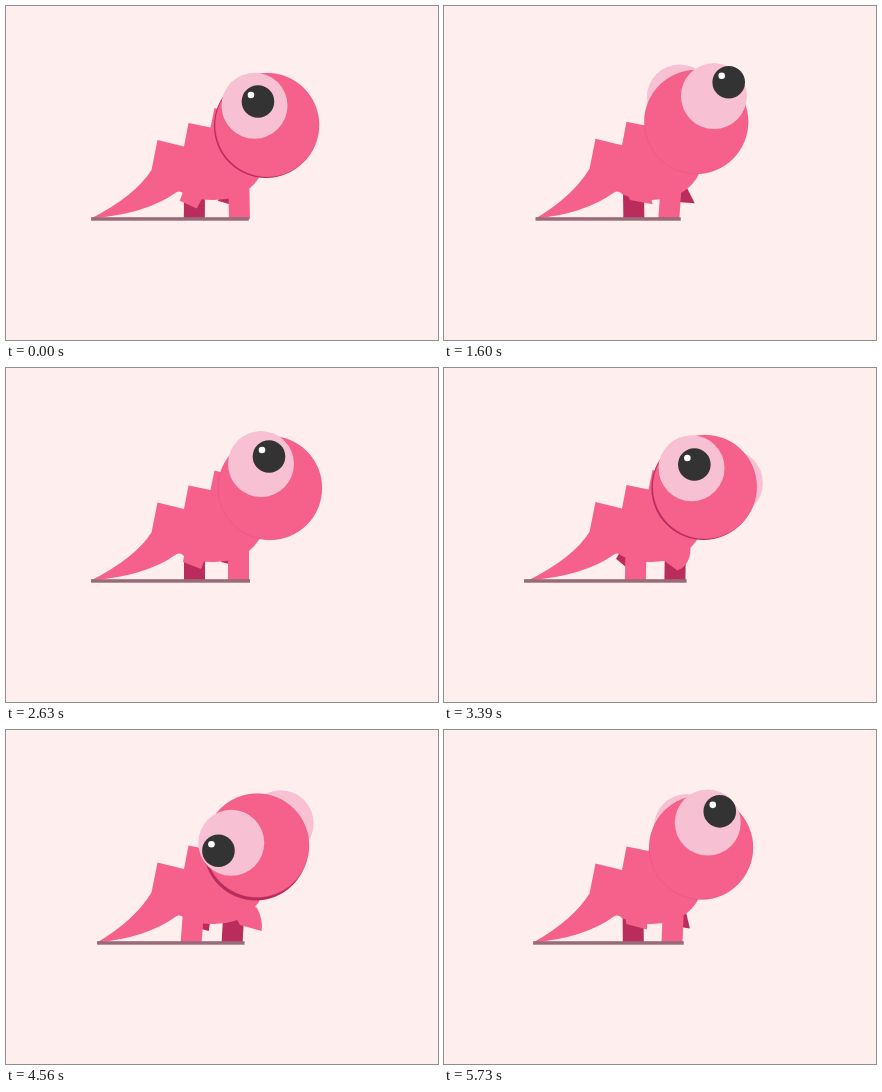
Write an HTML page with a canvas that moves like this. It is 432 px wide and 334 px high and loops after 5800 ms.

```html
<!DOCTYPE html>
<html lang="en">
<head>
<meta charset="utf-8">
<title>Walking dinosaur</title>
<style>
  html, body { margin: 0; width: 100%; height: 100%; overflow: hidden; background: #feefee; }
  canvas { display: block; }
</style>
</head>
<body>
<canvas id="stage" width="432" height="334"></canvas>
<script>
const ctx = document.getElementById('stage').getContext('2d');
const LOOP = 5800;
const C = {
  bg: '#feefee', pink: '#f5618b', dark: '#b92c5c', light: '#f8c0d3',
  ground: '#976b79', pupil: '#333333'
};

// Poses are held for about 70 ms; each beat is [start, last pose].
const beats = [[70, 630], [700, 1270], [1320, 1890], [1960, 2490], [2560, 3110],
  [3180, 3730], [3800, 4350], [4420, 4990], [5060, 5590], [5660, 6220]];
// Walk phase in strides at a few poses; it advances about a quarter per pose.
const strides = [[0, -0.077], [11, 2.5], [23, 5.2], [38, 9],
  [49, 11.583], [66, 15.735], [83, 20.13]];

const lerp = (a, b, k) => a + (b - a) * k;
const mix = (a, b, k) => a.map((v, i) => lerp(v, b[i], k));

function poseAt(t) {
  let pose = 0;
  beats.forEach(([start, end], g) => {
    for (let i = 0; i < 9; i++) {
      const at = start + Math.floor(i * (end - start) / 80 + 0.4) * 10;
      if (t >= at) pose = 1 + 9 * g + i;
    }
  });
  return Math.min(pose, 83);
}

function phaseAt(pose) {
  let i = 0;
  while (i < strides.length - 2 && pose >= strides[i + 1][0]) i++;
  const [a, pa] = strides[i], [b, pb] = strides[i + 1];
  const p = lerp(pa, pb, (pose - a) / (b - a));
  return p - Math.floor(p);
}

function disc(x, y, r, color) {
  ctx.fillStyle = color;
  ctx.beginPath();
  ctx.arc(x, y, r, 0, Math.PI * 2);
  ctx.fill();
}

function poly(points, color) {
  ctx.fillStyle = color;
  ctx.beginPath();
  points.forEach(([x, y]) => ctx.lineTo(x, y));
  ctx.closePath();
  ctx.fill();
}

// Planted leg: foot centre at rest, travel while it pushes back.
function planted(rest, travel, s, color) {
  const x = rest + travel * (s > 0 ? s : s * 0.5);
  const top = x - travel * 0.3 * s;
  poly([[top - 10.5, 180], [top + 10.5, 180], [x + 10.5, 213], [x - 10.5, 213]], color);
}

// Sole of a lifted leg: [heel x, heel y, toe x, toe y].
function sole(rest, front, s) {
  if (s > 0) return mix(rest, front, s);
  const back = [rest[0] - 15, rest[1] + 3, rest[2] - 20, rest[3] + 7];
  return mix(rest, back, -s);
}

function lifted(rest, front, s, hipA, hipB, color) {
  const [hx, hy, tx, ty] = sole(rest, front, s);
  poly([[hipA, 178], [hipB, 178], [tx, ty], [hx, hy]], color);
}

function body(tip, dy) {
  const y = v => v + dy;
  ctx.fillStyle = C.pink;
  ctx.beginPath();
  ctx.moveTo(tip, 212.5);
  ctx.quadraticCurveTo(129, 190, 145.5, y(164.5));
  ctx.lineTo(151.5, y(134.5));
  ctx.lineTo(178, y(141));
  ctx.lineTo(182.5, y(117.5));
  ctx.lineTo(204.5, y(122));
  ctx.lineTo(208.5, y(102.5));
  ctx.lineTo(226, y(107));
  ctx.lineTo(258, 160);
  ctx.quadraticCurveTo(254, 174, 243, 183);
  ctx.quadraticCurveTo(230, 194, 208, 194);
  ctx.quadraticCurveTo(190, 194, 178, 188);
  ctx.quadraticCurveTo(174, 184, 170, 186.5);
  ctx.quadraticCurveTo(140, 208, tip, 212.5);
  ctx.fill();
}

function nearFrontLifted(s) {
  const [hx, hy, tx, ty] = sole([217, 193, 226, 203], [234, 195, 256, 201], s);
  const k = Math.max(0, s);
  ctx.fillStyle = C.pink;
  ctx.beginPath();
  ctx.moveTo(224, 176);
  ctx.lineTo(hx, hy);
  ctx.lineTo(tx, ty);
  ctx.quadraticCurveTo(lerp(243, 257, k), lerp(200, 188, k), lerp(245, 251, k), lerp(181, 178, k));
  ctx.lineTo(244, 174);
  ctx.fill();
}

function farEye(u, e) {
  const near = [253, 105], left = [234, 90], low = [270, 122], right = [274, 93];
  if (u < 0.5) return mix(near, left, e);
  if (u < 1) return mix(low, left, e);
  if (u >= 1.5) return mix(near, right, e);
  const [x, y] = mix(low, right, e);
  return [x + 20 * Math.sin(2 * Math.PI * u) ** 2, y];
}

function draw(t) {
  const u = 2 * phaseAt(poseAt(t));
  const e = Math.sin(Math.PI * u) ** 2;
  const turnBack = u > 1;
  const nearStep = u < 0.5 || u >= 1.5;
  const s = (u % 1 < 0.5 ? 1 : -1) * e;

  ctx.fillStyle = C.bg;
  ctx.fillRect(0, 0, 432, 334);

  disc(...farEye(u, e), 33, C.light);

  if (nearStep) {
    planted(188.5, 1.5, s, C.dark);
    lifted([215, 194, 239, 200], [231, 196, 252, 197], s, 222, 241, C.dark);
  } else {
    planted(232.5, -6.5, s, C.dark);
    lifted([168, 189, 178, 201], [184, 196, 203, 201], s, 180, 206, C.dark);
  }

  const left = 82 + 3 * Math.cos(Math.PI * u) + 9.5 * (turnBack ? e * e : e);
  const right = 243.5 - (turnBack ? 5.5 : 8) * e;
  body(Math.max(left, 84), -2 * e);

  if (nearStep) {
    planted(232.5, -8.5, s, C.pink);
    lifted([177, 194, 195, 201], [187, 194, 210, 198], s, 180, 204, C.pink);
  } else {
    planted(193.5, -8.5, s, C.pink);
    nearFrontLifted(s);
  }

  ctx.fillStyle = C.ground;
  ctx.fillRect(left, 211.2, right - left + 0.5, 3.5);

  const hx = 264 - 13 * e, hy = 120 - 4.5 * e;
  if (turnBack) {
    const k = Math.min(1, 4 * e);
    disc(hx - 1.4 * k, hy + 0.5 * k + 2.5 * e, 52, C.dark);
  }
  disc(hx, hy, 52, C.pink);
  ctx.strokeStyle = 'rgba(185,44,92,0.25)';
  ctx.lineWidth = 0.6;
  ctx.stroke();

  const [ex, ey] = mix([255, 96], turnBack ? [225, 113] : [271.5, 89.5], e);
  const [px, py] = mix([263, 88.5], turnBack ? [212, 121] : [287, 75], e);
  disc(ex, ey, 33, C.light);
  disc(px, py, 16.3, C.pupil);
  disc(px - 7, py - 6.5, 3.3, '#ffffff');
}

const began = performance.now();
function tick() {
  draw((performance.now() - began) % LOOP);
  requestAnimationFrame(tick);
}
tick();
</script>
</body>
</html>
```
